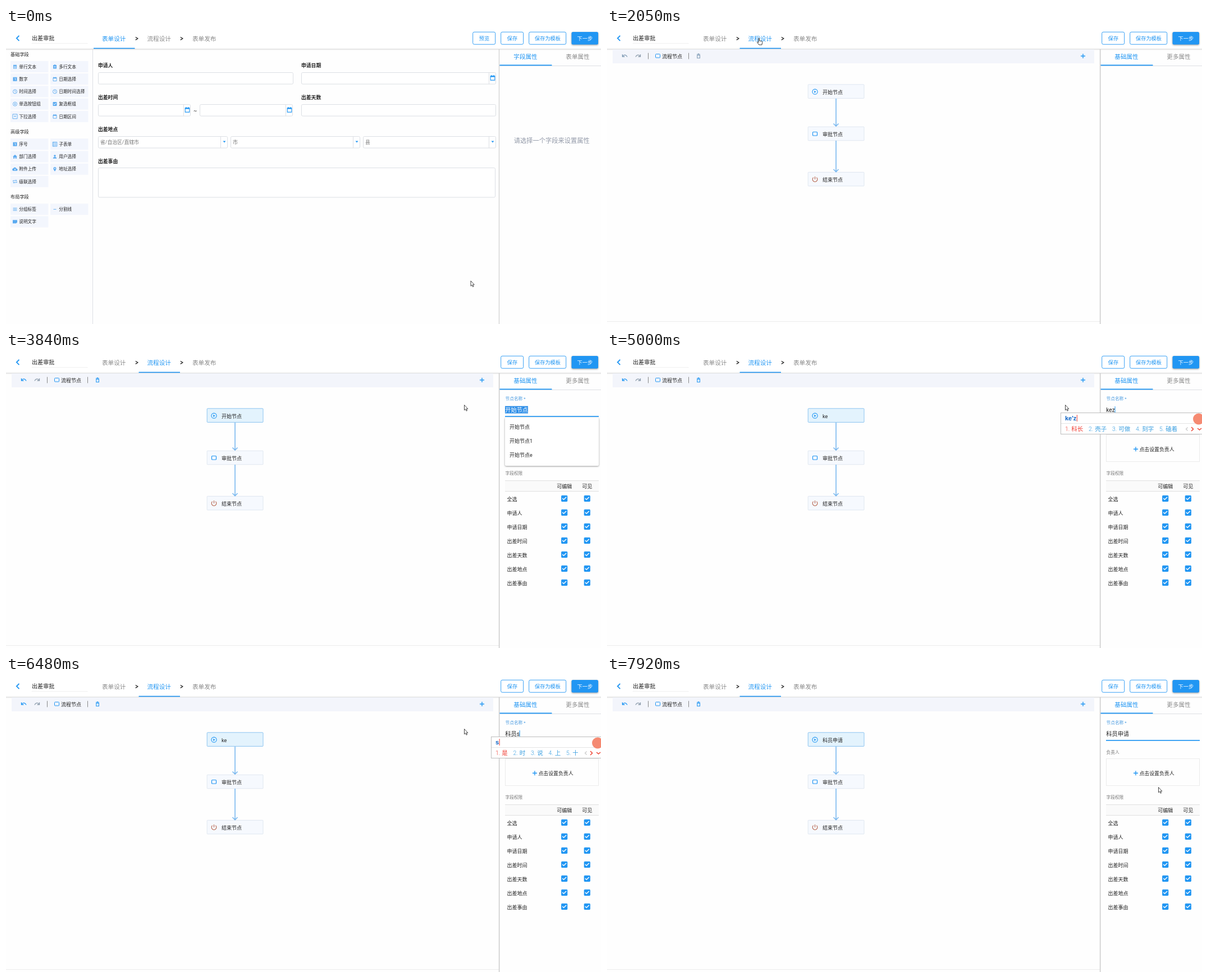
These frames come from a looping animation (1060 by 528 pixels, 8 s). An HTML page:

```html
<!DOCTYPE html>
<html lang="zh-CN">
<head>
<meta charset="utf-8">
<title>出差审批</title>
<style>
html, body { margin: 0; width: 100%; height: 100%; overflow: hidden; background: #fefefe; }
svg { display: block; font-family: Roboto, "Noto Sans CJK SC", "Noto Sans CJK", sans-serif; white-space: pre; }
.raised { filter: drop-shadow(0 1px 1.5px #0006); }
</style>
</head>
<body>
<svg id="stage" width="1060" height="528" viewBox="0 0 1060 528"></svg>
<script>
const BLUE = '#2196f3', INK = '#222', GREY = '#8a8a8a', LINE = '#dcdfe4';
const stage = document.getElementById('stage');
const pen = document.createElement('canvas').getContext('2d');

// Drawing helpers return SVG markup; text is placed by its vertical centre.
const text = (x, cy, s, size, fill = INK, more = '') =>
  `<text x="${x}" y="${cy + size * .4}" font-size="${size}" fill="${fill}" ${more}>${s}</text>`;
const mid = (x, cy, s, size, fill) => text(x, cy, s, size, fill, 'text-anchor="middle"');
const rect = (x, y, w, h, fill, stroke = 'none', more = '') =>
  `<rect x="${x}" y="${y}" width="${w}" height="${h}" fill="${fill}" stroke="${stroke}" ${more}/>`;
const path = (d, stroke, width = 1, fill = 'none', more = '') =>
  `<path d="${d}" stroke="${stroke}" stroke-width="${width}" fill="${fill}" ${more}/>`;
const circle = (x, y, r, stroke, fill = 'none', width = 1) =>
  `<circle cx="${x}" cy="${y}" r="${r}" stroke="${stroke}" fill="${fill}" stroke-width="${width}"/>`;
const widthOf = (s, font) => (pen.font = font, pen.measureText(s).width);
const clamp = (v, a = 0, b = 1) => Math.min(b, Math.max(a, v));
const ease = u => (u = clamp(u)) * u * (3 - 2 * u);

const RING = 'M-3.5 0a3.5 3.5 0 1 0 7 0a3.5 3.5 0 1 0-7 0z';
const OUTLINED = {
  cal: 'M-3-2.7h6v6h-6zM-3-1.6h6M-3-2.2h6M-1.6-4v1.5M1.6-4v1.5',
  clock: RING + 'M0-2v2l1.5 1',
  radio: RING + 'M-.8 0h1.6M0-.8v1.6M-.7-.7h1.4v1.4h-1.4z',
  drop: 'M-4-4h8v8h-8zM-1.5-.7h3l-1.5 1.5z',
  table: 'M-3.8-3.8h7.6v7.6h-7.6zM-2-3.8v7.6M-.5-2h3M-.5 0h3M-.5 2h3',
  swap: 'M-3.3 0v-1.8h6M1.5-3.3l1.5 1.5-1.5 1.5M3.3 0v1.8h-6M-1.5.3l-1.5 1.5 1.5 1.5',
  lines: 'M-3.5-2.2h7M-3.5 0h7M-3.5 2.2h7',
  dash: 'M-2.5 0h5'
};
const SOLID = {
  clip: 'M-3-3h2a1 1 0 0 1 2 0h2v6.5h-6zM-1.7-1h3.4v.7h-3.4zM-1.7.7h3.4v.7h-3.4z',
  num: 'M-3.5-3.5h7v7h-7zM-.7-2v.8h.7v3.2h.9v-4z',
  check: 'M-3.5-3h.5v-.5h6v.5h.5v6h-.5v.5h-6v-.5h-.5zM-2.5 0l.6-.6 1.2 1.2 2.6-2.6.6.6-3.2 3.2z',
  form: 'M-3-2.8h1v-1h1v1h2v-1h1v1h1v6.2h-6zM-2-.8v3.2h4v-3.2zM-1 0h2v1.4h-2z',
  home: 'M-4 0l4-3.6 4 3.6h-1.2v3.5h-2v-2.4h-1.6v2.4h-2v-3.5z',
  user: 'M0-3.3a1.7 1.7 0 1 1-.01 0zM-3.3 3.3c0-3.6 6.6-3.6 6.6 0z',
  cloud: 'M-2.5 3a2.2 2.2 0 0 1-.3-4.4a3 3 0 0 1 5.6.6a1.9 1.9 0 0 1 0 3.8zM0-1l-1.6 1.7h1v1.3h1.2v-1.3h1z',
  pin: 'M0 4c-4-4.5-2.6-7.6 0-7.6s4 3.1 0 7.6zM0-2.1a1 1 0 1 0 .01 0z',
  note: 'M-4-3h8v4l-2 2h-6z'
};
const icon = (name, x, y, scale = 1, color = '#5aaaf0') => {
  const at = `transform="translate(${x} ${y}) scale(${scale})" fill-rule="evenodd"`;
  return SOLID[name] ? path(SOLID[name], 'none', 0, color, at) : path(OUTLINED[name], color, .9, 'none', at);
};

function palette() {
  const groups = [
    [47, 69, '基础字段', 'form 单行文本,clip 多行文本,num 数字,cal 日期选择,clock 时间选择,clock 日期时间选择,radio 单选按钮组,check 复选框组,drop 下拉选择,cal 日期区间'],
    [185, 207.3, '高级字段', 'num 序号,table 子表单,home 部门选择,user 用户选择,cloud 附件上传,pin 地址选择,swap 级联选择'],
    [301, 323.4, '布局字段', 'lines 分组标签,dash 分割线,note 说明文字']
  ];
  return groups.map(([headY, top, head, items]) => text(8, headY, head, 8.2) +
    items.split(',').map((item, i) => {
      const [name, label] = item.split(' '), x = 8 + i % 2 * 71, y = top + (i >> 1) * 22.2;
      return rect(x, y - 10, 67.5, 20, '#f3f6fd') + icon(name, x + 8, y) + text(x + 15.2, y - .3, label, 7.7);
    }).join('')).join('') + path('M154.5 38V528', LINE);
}

function field(x, y, w, h = 21, kind, hint = '') {
  const end = x + w - 12.5, cy = y + 10;
  return rect(x + .5, y + .5, w - 1, h - .5, '#fff', LINE, 'rx="2"') +
    (kind ? path(`M${end} ${y}v${h}`, LINE) : '') +
    (kind === 'date' ? icon('cal', end + 6.5, cy, 1.25, BLUE) : '') +
    (kind === 'list' ? path(`M${end + 4} ${cy - 1.5}h5l-2.5 3z`, 'none', 0, BLUE) : '') +
    text(x + 4, cy + .5, hint, 8.8, '#777');
}

const sideTabs = (a, b) => path('M879 67.5H1060', LINE) + rect(879.5, 65.5, 93, 1.8, BLUE) +
  text(904.3, 51, a, 10.6, BLUE) + text(997.3, 51, b, 10.6, GREY);

const label = (x, cy, s) => text(x, cy, s, 8.8, INK, 'font-weight="700"');
const formPage = palette() +
  label(164, 66, '申请人') + field(164, 79, 348) +
  label(526, 66, '申请日期') + field(526, 79, 347, 21, 'date') +
  label(164, 123, '出差时间') + field(164, 136, 165, 21, 'date') + mid(337, 147, '~', 9) + field(345, 136, 166, 21, 'date') +
  label(526, 123, '出差天数') + field(526, 136, 347) +
  label(164, 180, '出差地点') + field(164, 193, 231, 21, 'list', '省/自治区/直辖市') +
  field(400, 193, 231, 21, 'list', '市') + field(636, 193, 237, 21, 'list', '县') +
  label(164, 237, '出差事由') + field(164, 249, 708, 53) +
  path('M878.5 38V528', '#c8c8c8') + sideTabs('字段属性', '表单属性') +
  mid(972.3, 200.5, '请选择一个字段来设置属性', 11.25, '#9299a8');

const button = (x, w, s) => rect(x - .3, 7.2, w, 22, '#fff', BLUE, 'rx="2.5" stroke-width=".9"') +
  mid(x + w / 2, 18, s, 9.2, BLUE);
const header = rect(0, 0, 1060, 37, '#fff') + rect(0, 37, 1060, 1, '#dadada') + rect(0, 38, 1060, 1.5, '#f2f2f2') +
  path('M23.4 13.7l-4.5 4.6 4.5 4.6', BLUE, 1.9) + text(46, 18, '出差审批', 10.1) +
  path('M46 27.5H145', '#e2e2e2', 1, 'none', 'stroke-dasharray="1 1"') +
  [230, 310].map(x => path(`M${x + .8} 16.2l4 2.6-4 2.6`, INK, 1.3)).join('') +
  button(882, 40, '保存') + button(932, 66, '保存为模板') +
  rect(1007.5, 7, 47.5, 22.5, BLUE, 'none', 'rx="2.5" class="raised"') + mid(1031.3, 18, '下一步', 9.2, '#fff');

function topBar(t) {
  const flow = t >= 1500;
  return header + (t < 1590 ? button(832, 40, '预览') : '') +
    text(171, 18.5, '表单设计', 10.6, flow ? GREY : BLUE) +
    text(251.5, 18.5, '流程设计', 10.6, flow ? BLUE : t < 870 ? GREY : '#444') +
    text(332, 18.5, '表单发布', 10.6, GREY) +
    rect((156 + 80.5 * ease((t - 1440) / 300)).toFixed(1), 35.5, 73.5, 1.6, BLUE);
}

function toolbar(active) {
  const on = active ? BLUE : '#7f9bb5', undo = 'M-4-2.5v4h4M-4 1.2C-1-3 3-1.5 4.5 2';
  return rect(10, 38, 858, 25, '#f3f5fb') +
    path(undo, on, 1.3, 'none', 'transform="translate(31.5 49.5)"') +
    path(undo, '#8b9bab', 1.3, 'none', 'transform="translate(55.5 49.5) scale(-1 1)"') +
    path('M73.5 44.5v11M145.5 44.5v11', '#888') +
    rect(86.5, 46.5, 8, 6.5, 'none', BLUE, 'rx="1"') + text(98, 50, '流程节点', 9) +
    path('M160 47h6M162 46h2M160.8 48.5h4.6v5.2h-4.6z', on, 1.1) + path('M844 50h8M848 46v8', BLUE, 1.4);
}

const node = (y, s, on) => rect(358.2, y, 99.8, 24.6, on ? '#e3f3fd' : '#f6f9fe', on ? '#8cc4f0' : '#dfe7f1', 'rx="1"') +
  text(384, y + 13.4, s, 9);
const edge = (a, b) => path(`M408 ${a}V${b}M403.5 ${b - 4.5}l4.5 4.5 4.5-4.5`, '#7ab8ef', 1.6);

function diagram(name, selected, hover) {
  return node(100.8, name, selected) + node(176.2, '审批节点') + node(257.3, '结束节点') +
    edge(126, 175) + edge(201, 256.5) +
    circle(370.5, 113.7, 4.6, BLUE, 'none', 1.1) + path('M369.3 111.5v4.4l3.2-2.2z', 'none', 0, BLUE) +
    rect(366.5, 185.5, 8, 6.5, 'none', BLUE, 'rx="1" stroke-width="1.2"') +
    path('M370.5 265v5M367.7 266.7a4.3 4.3 0 1 0 5.6 0', '#b5624a', 1.1) +
    (hover ? circle(408, 100.7, 2.4, '#5dade8', '#fff') + circle(358, 113.3, 2.4, '#5dade8', '#fff') +
      circle(458, 113.3, 2.4, '#5dade8', '#fff') + circle(408, 126, 3.4, '#5dade8', '#fff', 1.3) : '') +
    path('M0 523.5H878', '#ececec');
}

const rights = rect(889, 229, 167, 19.5, '#fafafa') + path('M889 229.5h167M889 248.5h167', '#e0e0e0') +
  text(889.5, 216, '字段权限', 7.7, '#777') + mid(994.7, 239.2, '可编辑', 9) + mid(1035.3, 239.2, '可见', 9) +
  ['全选', '申请人', '申请日期', '出差时间', '出差天数', '出差地点', '出差事由'].map((s, i) => {
    const y = 261.4 + i * 25;
    return text(892.5, y + .6, s, 9) + icon('check', 994.7, y, 1.6, BLUE) + icon('check', 1035.3, y, 1.6, BLUE);
  }).join('');
const owner = text(889.5, 136, '负责人', 7.7, '#777') +
  rect(889.5, 147.5, 166, 48, 'none', '#d8d8d8', 'stroke-dasharray="1 1"') +
  path('M938 173.2h8M942 169.2v8', BLUE, 1.4) + text(948.5, 173.5, '点击设置负责人', 8.9);
const suggestions = rect(889, 117, 167, 86, '#fff', 'none', 'rx="2" class="raised"') +
  ['', '1', 'e'].map((s, i) => text(897, 133.5 + i * 25, '开始节点' + s, 9)).join('');

// Typing states: start time, field value, then input window left edge, composition and candidates.
const TYPING = [
  [0, '开始节点'],
  [4370, 'k', 864, 'k', '看 可 快 开 课'],
  [4450, 'ke', 864, 'ke', '可 课 克 刻 颗'],
  [4840, 'kez', 808, "ke'z", '科长 壳子 可做 刻字 磕着'],
  [5380, 'kezu', 808, "ke'zu", '课组 可足 刻组 客组 科组'],
  [5540, 'kez', 808, "ke'z", '科长 壳子 可做 刻字 磕着'],
  [5690, 'ke', 808, 'ke', '可 课 克 刻 颗'],
  [6000, 'key', 808, "ke'y", '可以 课余 科研 客运 可用'],
  [6080, 'keyu', 808, "ke'yu", '课余 可与 可遇 刻于 客语'],
  [6160, 'keyua', 808, "ke'yua", '科员 客源 可愿 课员 客员'],
  [6230, 'keyuan', 808, "ke'yuan", '科员 客源 可愿 课员 客员'],
  [6310, '科员'],
  [6480, '科员s', 864, 's', '是 时 说 上 十'],
  [6560, '科员sh', 864, 'sh', '是 上 说 时 十'],
  [6620, '科员shen', 864, 'shen', '什 深 身 神 审'],
  [6690, '科员shenq', 836, "shen'q", '申请 神奇 深情 身躯 神情'],
  [6830, '科员shenqing', 808, "shen'qing", '申请 深情 神情 身轻 神清'],
  [6990, '科员申请']
];
const NAMES = [[0, '开始节点'], [4610, 'ke'], [5150, 'kez'], [5860, 'ke'], [7140, '科员申请']];
const latest = (list, t) => list.filter(s => s[0] <= t).pop();

function inputWindow(left, comp, words) {
  const font = '"Liberation Sans", Arial, sans-serif', x = left + 8;
  const caret = x + widthOf(comp, `700 11px ${font}`) + 1;
  let cx = x;
  const list = words.split(' ').map((w, i) => {
    const color = i ? '#3a9fe0' : '#f03c32', thin = 'font-weight="300"';
    const s = text(cx, 136.8, i + 1 + '.', 10.4, color, thin) + text(cx + 11.3, 136.8, w, 10.5, color, thin);
    cx += (w.length + 2) * 10.5;
    return s;
  }).join('');
  return rect(left + .5, 108.5, 300, 38, '#fff', '#bdbdbd') + path(`M${left + 1} 127.5H1060`, '#e4e4e4') +
    text(x, 118, comp, 11, '#0b62c4', `font-weight="700" font-family='${font}'`) +
    path(`M${caret} 112v12`, '#f03c32') +
    `<svg width="1019" height="528">${list}</svg>` +
    path('M1034.5 134.5l-3 3 3 3', '#c8c8c8', 1.2) + path('M1041 134l3.5 3.5-3.5 3.5M1052 136l3.5 3 3.5-3', '#ee4a3a', 1.6) +
    circle(1054, 119.5, 10, 'none', '#f58a72');
}

function properties(t, [, value, left, comp, words], cursorX) {
  const focus = t >= 3440, caret = 889.5 + widthOf(value, '10.2px Roboto, "Noto Sans CJK SC", sans-serif');
  const from = clamp(cursorX, 889, 930), picked = focus && t < 4370;
  return text(889.5, 83, '节点名称 *', 7.7, focus ? '#4a9be0' : '#777') +
    (picked ? rect(from, 96.5, 930 - from, 13, '#2f8fe8') : '') +
    text(889.3, 103, value, 10.2, picked && from < 900 ? '#fff' : INK) +
    (comp ? path(`M${caret} 97v12`, BLUE) : '') +
    rect(889, focus ? 114 : 114.7, 167, focus ? 1.7 : 1, focus ? BLUE : '#999') +
    owner + rights + (picked ? suggestions : '') + (comp ? inputWindow(left, comp, words) : '');
}

const MOVES = [
  [10, 828, 451], [715, 270, 18], [2020, 270, 18], [2500, 430.5, 117], [2860, 430.5, 117], [3340, 936, 103],
  [3440, 936, 103], [3680, 862, 98], [3810, 816.5, 94.5], [7500, 816.5, 94.5], [7780, 955, 217], [7910, 982.5, 198.5]
];
function cursorAt(time) {
  const t = Math.floor(time / 72) * 72;   // the pointer moves in visible steps
  const i = MOVES.findIndex(m => m[0] > t);
  if (i < 1) return (i ? MOVES[MOVES.length - 1] : MOVES[0]).slice(1);
  const [t0, x0, y0] = MOVES[i - 1], [t1, x1, y1] = MOVES[i], u = ease((t - t0) / (t1 - t0));
  return [x0 + (x1 - x0) * u, y0 + (y1 - y0) * u];
}

function pointer(x, y, overNode) {
  const at = `transform="translate(${x} ${y})" stroke-linejoin="round"`;
  if (overNode) return path('M0-5.5l2 2h-1.2v2.7h2.7v-1.2l2 2-2 2v-1.2h-2.7v2.7h1.2l-2 2-2-2h1.2v-2.7h-2.7v1.2l-2-2 2-2v1.2h2.7v-2.7h-1.2z', '#333', .8, '#fff', at);
  if (y < 37 && x > 237 && x < 310) return path('M0 .8c0-1.1 1.7-1.1 1.7 0v4l4 .8c1 .3 1.2 1 1 2l-.8 4.4h-5l-3.2-4c-.6-1 .6-1.6 1.3-.9l1 1z', '#222', .9, '#fff', at);
  if (x > 889 && y > 94 && y < 115) return path('M-2-5h4M0-5v10M-2 5h4', '#333', .9, 'none', at);
  return path('M0 0v9.3l2.1-1.9 1.5 3.3 1.5-.7-1.5-3.1h2.7z', '#333', .9, '#fff', at);
}

function scene(t) {
  const [x, y] = cursorAt(t), flow = t >= 1590, selected = t >= 2500;
  const overNode = flow && x > 358 && x < 458 && y > 101 && y < 126;
  const page = flow
    ? toolbar(t >= 2740) + diagram(latest(NAMES, t)[1], selected, overNode && selected) +
      rect(877.8, 38, 1.8, 490, '#d2d2d2') + sideTabs('基础属性', '更多属性') +
      (selected ? properties(t, latest(TYPING, t), x) : '')
    : formPage;
  return topBar(t) + page + pointer(x, y, overNode);
}

let shown = '';
function draw() {
  const next = scene(performance.now() % 8000);
  if (next !== shown) stage.innerHTML = shown = next;
  requestAnimationFrame(draw);
}
draw();
</script>
</body>
</html>
```
